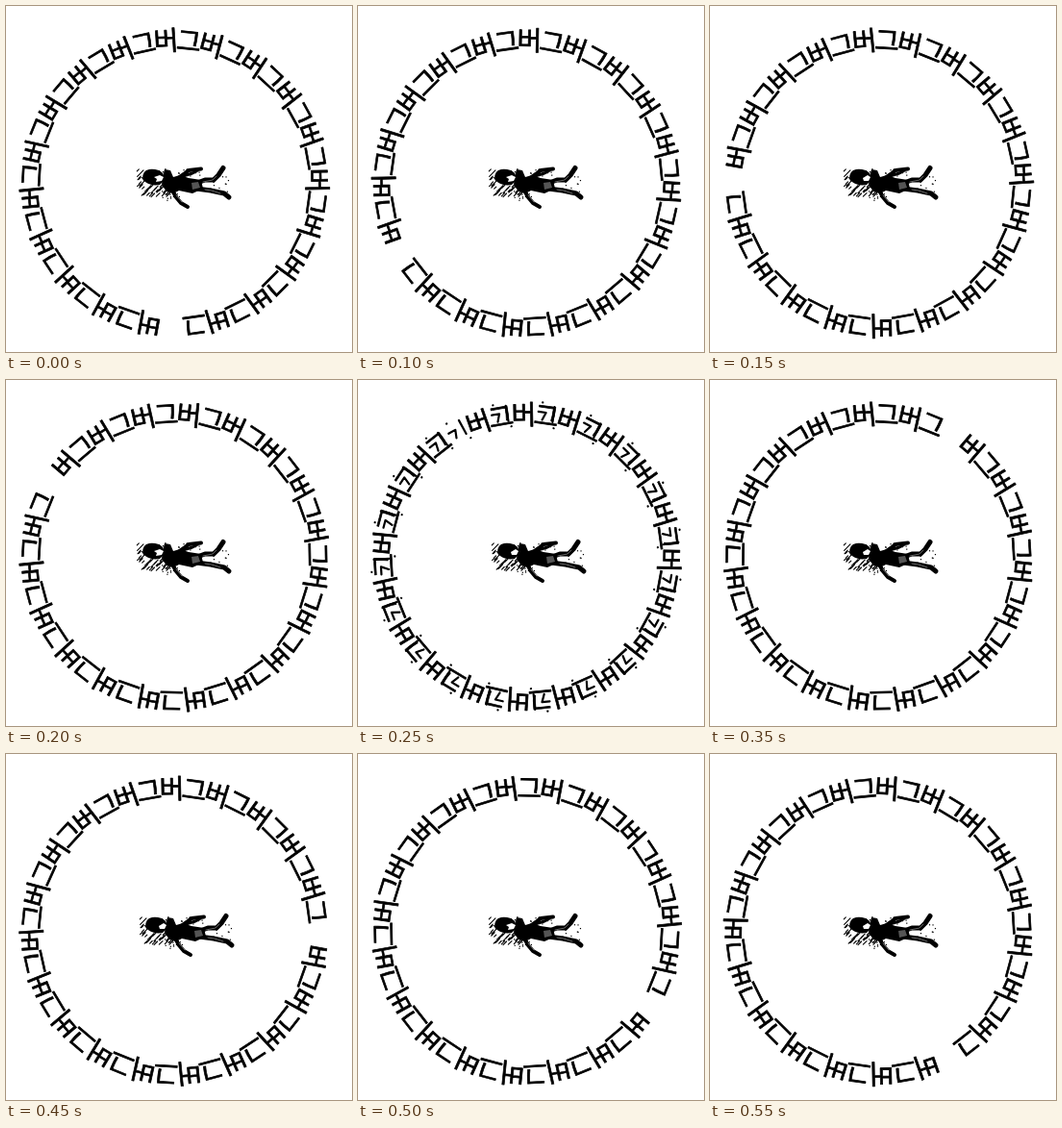
An HTML page that plays this animation: 360 px wide and 360 px high, repeating every 600 ms.

```html
<!DOCTYPE html>
<html lang="ko">
<head>
<meta charset="utf-8">
<style>
html, body { margin: 0; width: 100%; height: 100%; overflow: hidden; background: #fff; }
svg { display: block; width: 100vw; height: 100vh; }
text {
  font: 500 28px 'Noto Sans CJK KR', 'Noto Sans CJK', sans-serif; text-anchor: middle;
  stroke: #000; stroke-width: .7; stroke-linejoin: round;
}
.ink { fill: none; stroke: #000; stroke-linecap: round; stroke-linejoin: round; }
</style>
</head>
<body>
<svg viewBox="0 0 360 360">
  <rect width="360" height="360" fill="#fff"/>
  <g id="ring"></g>
  <g id="body">
    <g id="specks"></g>
    <path class="ink" stroke-width="1.1" id="hatch"/>
    <g class="ink" stroke-width="4">
      <path d="M178 180 L185 175 L190 171 L203 169.5"/>
      <path d="M184 177 L194 174 L198 172" stroke-width="3"/>
      <path d="M172 190 L177 199 L182 205 L189 209"/>
      <path d="M199 184 L207 181 L216 181 L221 176 L226 168.5" stroke-width="5"/>
      <path d="M198 190 L213 192 L227 195 L232 199" stroke-width="5"/>
    </g>
    <path d="M163 177 L165 170 L171 171 L174 178 L181 176 L190 179 L203 181 L205 190 L194 195 L180 192 L174 195 L167 193 L162 186 Z"/>
    <path d="M193 184 L200 183 L202 189 L194 191 Z" fill="#555"/>
    <g class="ink" style="stroke:#666" stroke-width="1">
      <path d="M205 183 L215 181 L219 177"/>
      <path d="M207 191 L214 192 L223 195"/>
      <path d="M177 197 L183 204"/>
    </g>
    <path d="M142 180 Q142 171 149 170 Q158 169 163 174 L165 181 L160 186 Q148 188 142 180 Z"/>
    <path id="face" fill="#fff"/>
  </g>
</svg>
<script>
const NS = 'http://www.w3.org/2000/svg';
const get = id => document.getElementById(id);
const CX = 175.3, CY = 184.3, R = 148.7;
// 39 equal slots, one of them empty
const SLOTS = 39, PITCH = 360 / SLOTS, START = 100.4;

function add(parent, tag, attrs) {
  const el = document.createElementNS(NS, tag);
  for (const k in attrs) el.setAttribute(k, attrs[k]);
  return parent.appendChild(el);
}

let seed = 11;
const rnd = () => (seed = seed * 16807 % 2147483647) / 2147483647;

// One slot on the ring, with its origin at the middle of the glyph
const slot = i => add(get('ring'), 'g', {
  transform: `translate(${CX} ${CY}) rotate(${START + i * PITCH + 90}) translate(0 ${-R})`
});

const glitches = [];
function addGlitch(parent) {
  glitches.push(add(parent, 'path', {
    class: 'ink', 'stroke-width': 2.2,
    d: 'M-9 -3 H-1 L-4 5 M7 -10 V6 M-6 -13 h.2 M9 12 h.2'
  }));
}

for (let i = 0; i < SLOTS - 1; i++) {
  const g = slot(i);
  add(g, 'text', { y: 10.5 }).textContent = i % 2 ? '그' : '버';
  if (i % 2) addGlitch(g);
}
addGlitch(slot(-1));

let lines = '';
for (let i = 0; i < 34; i++) {
  const x = 142 + (i % 17) * 1.8, y = 185 + rnd() * 10, n = 2 + rnd() * 2;
  lines += `M${x} ${y}l${-n} ${n}`;
}
for (let i = 0; i < 11; i++) lines += `M${138 + rnd() * 6} ${169 + rnd() * 17}l-2 2`;
get('hatch').setAttribute('d', lines);

function speckle(n, x, y, w, h) {
  while (n--) add(get('specks'), 'rect', {
    x: x + rnd() * w, y: y + rnd() * h, width: 1.2, height: 1.2
  });
}
speckle(12, 138, 167, 30, 14);
speckle(14, 162, 192, 18, 12);
speckle(14, 176, 168, 30, 9);
speckle(12, 212, 177, 21, 16);

const faces = ['M154 178 L160 176 L164 178 L162 182 L156 183 L157 180 Z',
               'M156 179 L161 176 L164 178 L162 182 L157 182 Z'];
let last = -1;

function draw(ms) {
  const step = Math.floor(ms / 50) % 12;
  if (step === last) return;
  last = step;
  const odd = step % 2;
  get('ring').setAttribute('transform', `rotate(${step * 30} ${CX} ${CY})`);
  get('body').setAttribute('transform', `translate(${odd * 3} 0)`);
  get('face').setAttribute('d', faces[odd]);
  for (const g of glitches) g.style.display = step === 5 ? '' : 'none';
}

const t0 = performance.now();
function tick() {
  draw(performance.now() - t0);
  requestAnimationFrame(tick);
}
tick();
</script>
</body>
</html>
```
